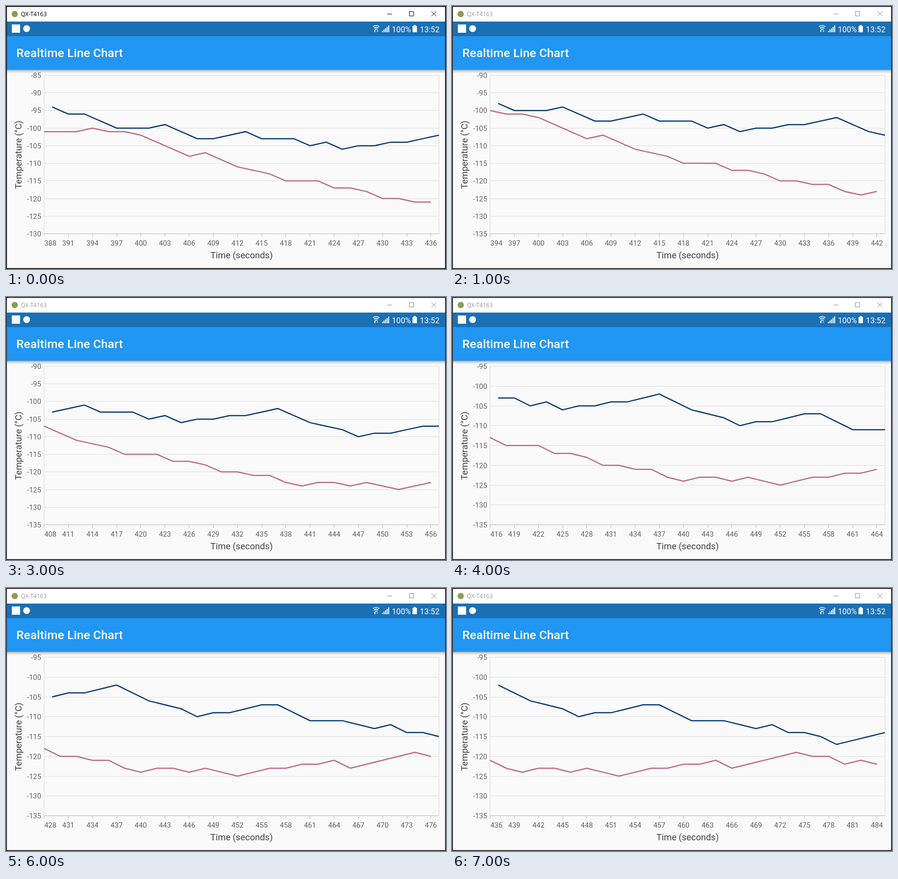
Animation of 907 by 541 pixels, one loop 8 s. Source, as an HTML page:

```html
<!DOCTYPE html>
<html lang="en">
<head>
<meta charset="utf-8">
<title>Realtime Line Chart</title>
<style>
  html, body { margin: 0; width: 100%; height: 100%; overflow: hidden; background: #2b2b2b; }
  svg { display: block; width: 907px; height: 541px; font-family: Roboto, sans-serif; }
  .caption { font: 12px "Open Sans", sans-serif; }
  .status { font-size: 16.2px; fill: #fff; }
  .heading { font-size: 24.7px; font-weight: 500; letter-spacing: .13px; fill: #fff; }
  .tick { font-size: 14.8px; fill: #616161; }
  .axis { font-size: 18.5px; fill: #424242; text-anchor: middle; }
  .mid { text-anchor: middle; }
  .end { text-anchor: end; }
  .series { fill: none; stroke-width: 2.5; stroke-linejoin: miter; }
</style>
</head>
<body>
<svg viewBox="0 0 907 541">
  <defs>
    <linearGradient id="shade" x2="0" y2="1">
      <stop offset="0" stop-color="#000" stop-opacity=".36"/>
      <stop offset=".4" stop-color="#000" stop-opacity=".13"/>
      <stop offset="1" stop-color="#000" stop-opacity="0"/>
    </linearGradient>
  </defs>

  <rect id="frame" x="1.5" y="1.5" width="904" height="538" fill="#fafafa"/>

  <!-- window bar -->
  <rect x="2" y="2" width="903" height="30" fill="#fff"/>
  <circle cx="18" cy="16.5" r="6.5" fill="#8f9c55"/>
  <text id="caption" class="caption" x="30.5" y="20.5">QX-T4163</text>
  <path id="buttons" fill="none" d="M786 16.5h10M831.5 11.5h9v9h-9zM877 11l10 10M887 11l-10 10"/>

  <!-- status bar -->
  <rect x="2" y="32" width="903" height="30" fill="#1a70b5"/>
  <rect x="12" y="38" width="17" height="17" fill="#fff"/>
  <circle cx="42.5" cy="46.5" r="7" fill="#fff"/>
  <g fill="none" stroke="#fff" stroke-width="1.7">
    <path d="M756.5 42.5q6.5-5 13 0M758.5 45.5q4.5-3.6 9 0M760.5 48.3q2.5-2 5 0"/>
  </g>
  <path id="up" fill="#fff" d="M758 51.5l2.3-3 2.3 3h-1.4v2.5h-1.8v-2.5z"/>
  <path id="down" fill="#fff" d="M763.4 51l2.3 3 2.3-3h-1.4v-2h-1.8v2z"/>
  <path fill="#fff" d="M775 51h2v3h-2zM778.2 48.5h2v5.5h-2zM781.4 46h2v8h-2zM784.6 43h2v11h-2zM787.8 40h2v14h-2z"/>
  <text class="status" x="795.5" y="53.5">100%</text>
  <path fill="#fff" d="M840.5 39h4v2h2.5v13h-9v-13h2.5z"/>
  <text class="status end" x="893.5" y="53.5">13:52</text>

  <!-- app bar -->
  <rect x="2" y="62" width="903" height="69" fill="#2196f3"/>
  <rect x="2" y="131" width="903" height="8" fill="url(#shade)"/>
  <text class="heading" x="21.3" y="105.3">Realtime Line Chart</text>

  <g id="chart"></g>
  <text class="axis" x="485.5" y="519.3">Time (seconds)</text>
  <text class="axis" transform="translate(32 306) rotate(-90)">Temperature (°C)</text>
</svg>

<script>
const PLOT = { x: 78.5, y: 142.5, w: 814, h: 326 };
const SPAN = 49;
const STEP_MS = 1000;

// Degrees below zero, one reading every two seconds.
const navy = { start: 389, color: '#0c3b73', values: [
  94, 96, 96, 98, 100, 100, 100, 99, 101, 103, 103, 102, 101, 103, 103, 103, 105,
  104, 106, 105, 105, 104, 104, 103, 102, 104, 106, 107, 108, 110, 109, 109, 108,
  107, 107, 109, 111, 111, 111, 112, 113, 112, 114, 114, 115, 117, 116, 115, 114] };
const rose = { start: 388, color: '#be6a86', values: [
  101, 101, 101, 100, 101, 101, 102, 104, 106, 108, 107, 109, 111, 112, 113, 115, 115,
  115, 117, 117, 118, 120, 120, 121, 121, 123, 124, 123, 123, 124, 123, 124, 125,
  124, 123, 123, 122, 122, 121, 123, 122, 121, 120, 119, 120, 120, 122, 121, 122] };

// First second, top and bottom of the scale.
const views = [
  [388, 85, 130], [394, 90, 135], [402, 90, 135], [408, 90, 135],
  [416, 95, 135], [422, 95, 135], [428, 95, 135], [436, 95, 135]];

const $ = id => document.getElementById(id);
const label = (cls, x, y, text) => `<text class="tick ${cls}" x="${x}" y="${y}">${text}</text>`;
const stroke = (d, color, width = 1) =>
  `<path fill="none" d="${d}" stroke="${color}" stroke-width="${width}"/>`;

function chart([first, top, bottom]) {
  const { x, y, w, h } = PLOT;
  const px = s => x + (s - first) / SPAN * w;
  const py = v => y + (v - top) / (bottom - top) * h;
  let grid = '', ticks = '', labels = '';

  for (let v = top; v <= bottom; v += 5) {
    const gy = Math.round(py(v) - .5) + .5;
    grid += `M${x} ${gy}h${w}`;
    labels += label('end', 72.5, gy + 5.5, -v);
  }
  for (let s = first; s <= first + SPAN; s += 3) {
    const gx = Math.round(px(s) - .5) + .5;
    ticks += `M${gx} ${y + h}v6`;
    labels += label('mid', s === first ? x + 13 : px(s), 492.5, s);
  }
  const line = ({ start, color, values }) => {
    const points = values
      .map((v, i) => [start + 2 * i, v])
      .filter(([s]) => s >= first && s <= first + SPAN)
      .map(([s, v]) => `${px(s).toFixed(2)},${py(v).toFixed(2)}`);
    return `<polyline class="series" stroke="${color}" points="${points.join(' ')}"/>`;
  };

  return stroke(grid, '#dedede') +
    stroke(`M${x} ${y}h${w}v${h}h${-w}z`, '#dadada') +
    stroke(`M${x} ${y + h}h${w}${ticks}`, '#b5b5b5') +
    labels + line(navy) + line(rose);
}

let shown = -1;

function show(i) {
  const active = i === 0;
  $('chart').innerHTML = chart(views[i]);
  $('caption').setAttribute('fill', active ? '#000' : '#999');
  $('buttons').setAttribute('stroke', active ? '#000' : '#8c8c8c');
  $('frame').setAttribute('stroke', active ? '#222' : '#484848');
  $('up').setAttribute('opacity', i < 2 ? .75 : 1);
  $('down').setAttribute('opacity', i < 2 || i === 7 ? .55 : .4);
}

function tick() {
  const i = Math.floor(performance.now() / STEP_MS) % views.length;
  if (i !== shown) show(shown = i);
  requestAnimationFrame(tick);
}
tick();
</script>
</body>
</html>
```
